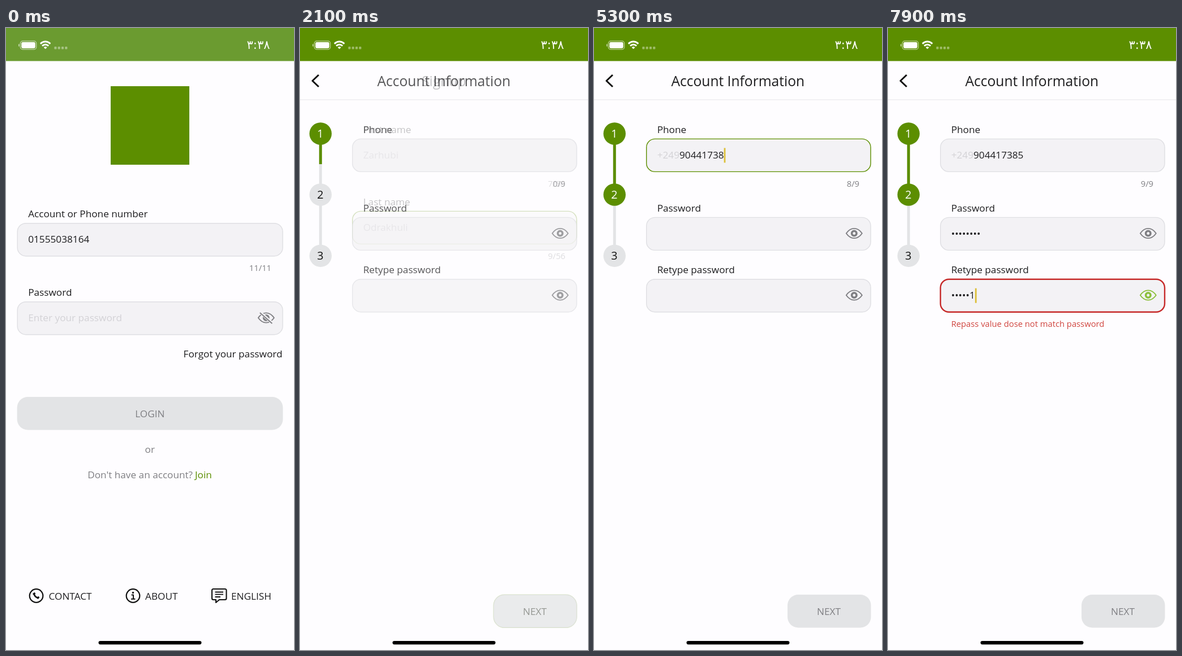
These frames come from a looping animation (509x1101 px, 8 s). An HTML page:

```html
<!DOCTYPE html>
<html lang="en">
<head>
<meta charset="utf-8">
<title>Sign up</title>
<style>
  html, body { margin: 0; width: 100%; height: 100%; overflow: hidden; background: #fefdff; }
  svg { display: block; font-family: "Open Sans", "Noto Sans", sans-serif; }
  .clock { font-family: "DejaVu Sans", sans-serif; }
</style>
</head>
<body>
<svg id="stage" width="509" height="1101" viewBox="0 0 509 1101"></svg>
<script>
const W = 509, H = 1101, LOOP = 8000, STEP = 100;
const GREEN = '#5c8e00', INK = '#1d1d1f', GREY = '#7f7f83', PALE = '#d3d2d6',
      OFF = '#e3e4e6', PAPER = '#fefdff', LIME = '#8cc03c', RED = '#d0453f';
const SIZE = 17.2, SMALL = 14.75;
const FIRST = 'Zarhubi', LAST = 'Odrakhuli', PASSWORD = 'ad237168';

// Key strokes by tick of 100 ms; "<" deletes.
const phoneKeys = [[33, '9'], [34, '0'], [35, '4'], [37, '4'], [40, '1'], [42, '5'], [43, '2'],
  [45, '<'], [46, '<'], [49, '7'], [52, '3'], [53, '8'], [56, '5']];
const passTicks = [60, 61, 62, 63, 64, 65, 66, 68];
const retypeTicks = [74, 75, 76, 77, 78, 79];

const stage = document.getElementById('stage');
const pen = document.createElement('canvas').getContext('2d');
const clamp = v => Math.max(0, Math.min(1, v));

function widthOf(s) {
  pen.font = `${SIZE}px "Open Sans", "Noto Sans", sans-serif`;
  return pen.measureText(s).width;
}

const text = (s, x, y, fill = INK, size = SIZE, anchor = 'start') =>
  `<text x="${x}" y="${y}" fill="${fill}" font-size="${size}" text-anchor="${anchor}">${s}</text>`;

const box = (x, y, w, h, r, fill, stroke = 'none', line = 1.4) =>
  `<rect x="${x}" y="${y}" width="${w}" height="${h}" rx="${r}" fill="${fill}" stroke="${stroke}" stroke-width="${line}"/>`;

const disc = (x, y, r, fill, stroke = 'none', line = 0) =>
  `<circle cx="${x}" cy="${y}" r="${r}" fill="${fill}" stroke="${stroke}" stroke-width="${line}"/>`;

const line = (d, color, w, fill = 'none') =>
  `<path d="${d}" fill="${fill}" stroke="${color}" stroke-width="${w}" stroke-linejoin="round"/>`;

const group = (s, x = 0, opacity = 1) =>
  `<g transform="translate(${x})" opacity="${opacity}">${s}</g>`;

function eye(y, color, crossed) {
  return `<g transform="translate(459.8 ${y})">` +
    line('M-14 0Q-8-8.6 0-8.6T14 0Q8 8.6 0 8.6T-14 0Z', color, 1.9) +
    disc(0, 0, 4.2, 'none', color, 3.6) +
    (crossed ? line('M-10.5-9.5L11 9.5', '#f3f2f5', 5) + line('M-11-9L10.5 10', color, 1.9) : '') +
    '</g>';
}

function field({ x = 92.7, y, label, value = '', tint = INK, count, border = '#dfdfe3', weight = 1.4 }) {
  const left = x + 19;
  return text(label, left, y - 10.7) +
    box(x, y, 489 - x, 58, 15, '#f3f2f5', border, weight) +
    text(value, left, y + 34.3, tint) +
    (count ? text(count, 469, y + 84.3, GREY, SMALL, 'end') : '');
}

const caret = (x, y) => box(x, y + 16, 2.8, 26, 0, '#dcc03a');

function nextButton(active) {
  return active
    ? box(342.2, 1003.3, 146.8, 58, 19, PAPER, GREEN) + text('NEXT', 415, 1039, GREEN, SIZE, 'middle')
    : box(342, 1003, 147.5, 58.5, 19, OFF) + text('NEXT', 415, 1039, GREY, SIZE, 'middle');
}

function footer() {
  const ring = x => disc(x, 1005, 11.8, 'none', '#111', 2.2);
  const handset = line('M49.5 1000.5Q50 1007.5 57.5 1009', '#111', 2.8) +
    line('M48.6 1000.2L50.8 1002.6M55.6 1007.4L58 1009.4', '#111', 4.4);
  const info = disc(224.5, 999.5, 1.7, '#111') +
    line('M221.6 1003.6H225V1010.6M221 1010.8H228.4', '#111', 2);
  const chat = line('M366.5 993H387Q389.5 993 389.5 995.5V1009.5Q389.5 1012 387 1012H377L371 1017V1012H366.5Q364 1012 364 1009.5V995.5Q364 993 366.5 993Z', '#111', 2.1) +
    line('M369.5 998.5H384M369.5 1002.7H384M369.5 1007H379', '#111', 1.8);
  return ring(53.5) + handset + ring(224.5) + info + chat +
    text('CONTACT', 75.5, 1011.5) + text('ABOUT', 246, 1011.5) + text('ENGLISH', 398, 1011.5);
}

function loginPage() {
  return box(0, 0, W, H, 0, PAPER) + box(0, 0, W, 58.5, 0, '#6b9b30') +
    box(185, 103, 139, 139, 0, GREEN) +
    field({ x: 20.2, y: 345.7, label: 'Account or Phone number', value: '01555038164', count: '11/11' }) +
    field({ x: 20.2, y: 484.7, label: 'Password', value: 'Enter your password', tint: PALE }) +
    eye(513, GREY, true) +
    text('Forgot your password', 488.5, 583, INK, SIZE, 'end') +
    box(19.6, 653, 469.8, 58.5, 19, OFF) + text('LOGIN', 254.3, 689.3, GREY, SIZE, 'middle') +
    text('or', 254.3, 752, GREY, SIZE, 'middle') +
    text("Don't have an account?", 330, 797, GREY, SIZE, 'end') + text('Join', 334, 797, GREEN) +
    footer();
}

function steps(grow) {
  const x = 36.3, ys = [187, 295, 403.3];
  const rail = (a, b, color) => line(`M${x} ${a}V${b}`, color, 5);
  const reached = [true, grow >= 0.8, false];
  return rail(187, 403, OFF) + rail(187, 187 + 108 * grow, GREEN) +
    ys.map((y, i) => disc(x, y, 19.7, reached[i] ? GREEN : OFF) +
      text(i + 1, x - 0.3, y + 7, reached[i] ? '#fff' : '#111', 19.7, 'middle')).join('');
}

const title = s => text(s, 254.3, 102.5, INK, 24.6, 'middle');

function namesPage(k) {
  const filled = k >= 15;
  return title('Signup') +
    field({ y: 196.4, label: 'First name', value: filled ? FIRST : '', count: `${filled ? FIRST.length : 0}/56` }) +
    field({ y: 324.4, label: 'Last name', value: filled ? LAST : '', count: `${filled ? LAST.length : 0}/56`,
            border: filled ? GREEN : undefined }) +
    nextButton(filled);
}

function typedPhone(k) {
  return phoneKeys.filter(([at]) => at <= k)
    .reduce((s, [, key]) => key === '<' ? s.slice(0, -1) : s + key, '');
}

// The last character stays readable while the field has focus.
function masked(ticks, k, focused) {
  const n = ticks.filter(at => at <= k).length;
  return n && focused ? '•'.repeat(n - 1) + PASSWORD[n - 1] : '•'.repeat(n);
}

function accountPage(k) {
  const phone = typedPhone(k), prefix = '+249', left = 111.7;
  const onPhone = k >= 30 && k < 57, onPass = k >= 57 && k < 71, onRetype = k >= 71;
  const pass = masked(passTicks, k, onPass), retype = masked(retypeTicks, k, onRetype);
  const wrong = k >= 60;
  const numberX = left + widthOf(prefix);
  return title('Account Information') +
    field({ y: 196.4, label: 'Phone', value: k >= 31 ? prefix : '', tint: PALE, count: `${phone.length}/9`,
            border: onPhone && k >= 31 ? GREEN : undefined }) +
    text(phone, numberX, 230.7) +
    field({ y: 335.4, label: 'Password', value: pass, border: onPass ? GREEN : undefined }) +
    eye(363.5, onPass ? LIME : GREY) +
    field({ y: 444.7, label: 'Retype password', value: retype,
            border: wrong ? (onRetype ? '#c62a2a' : RED) : undefined, weight: onRetype ? 2.4 : 1.4 }) +
    eye(473, onRetype ? LIME : GREY) +
    (wrong ? text('Repass value dose not match password', left, 528.8, RED, SMALL) : '') +
    (onPhone ? caret(numberX + widthOf(phone), 196.4) : '') +
    (onPass ? caret(left + widthOf(pass), 335.4) : '') +
    (onRetype ? caret(left + widthOf(retype), 444.7) : '') +
    nextButton(false);
}

function signupPage(k) {
  const fade = clamp((k - 18) / 4), grow = clamp((k - 18) / 6);
  return box(0, 0, W, H, 0, PAPER) + box(0, 0, W, 58.5, 0, GREEN) +
    line(`M0 127H${W}`, '#e7e6ea', 1.2) +
    line('M33 83L22 93.5L33 104', '#111', 3) + steps(grow) +
    (fade < 1 ? group(namesPage(k), 0, 1 - fade) : '') +
    (fade > 0 ? group(accountPage(k), 0, fade) : '');
}

function statusBar() {
  const wifi = line('M60.8 27.8Q69.6 20.4 78.4 27.8M64 31.6Q69.6 27 75.2 31.6', '#fff', 2.9) +
    line('M67 34.3Q69.6 32.2 72.2 34.3L69.6 37Z', '#fff', 0.6, '#fff');
  const dots = [0, 1, 2, 3].map(i => box(85.3 + i * 6.3, 33, 4.2, 4.4, 1, '#ffffff66')).join('');
  return box(25.3, 23.2, 28.4, 14.6, 4, 'none', '#ffffffa0', 1.2) + box(27.2, 25, 24.6, 11, 2.4, '#fff') +
    box(22, 28.2, 1.6, 4.6, 0.8, '#ffffffa0') + wifi + dots +
    `<g class="clock">${text('٣:٣٨', 446, 37, '#fff', 21, 'middle')}</g>`;
}

// Critically damped slide of the pushed page.
function slide(k) {
  if (k < 8) return 0;
  if (k > 11) return 1;
  const u = 17 * (k / 10 - 0.762);
  return 1 - (1 + u) * Math.exp(-u);
}

const shade = '<defs><linearGradient id="shade"><stop offset="0" stop-color="#000" stop-opacity="0"/>' +
  '<stop offset="1" stop-color="#000" stop-opacity=".17"/></linearGradient></defs>';

function draw(k) {
  const p = slide(k), x = W * (1 - p);
  stage.innerHTML = shade +
    (p < 1 ? group(loginPage(), -W * p / 3) : '') +
    (p > 0 ? group((p < 1 ? box(-14, 0, 14, H, 0, 'url(#shade)') : '') + signupPage(k), x) : '') +
    statusBar() + box(163.5, 1085, 182, 6.2, 3.1, '#000');
}

let shown = -1;
const start = performance.now();
function tick() {
  const k = Math.floor(((performance.now() - start) % LOOP) / STEP);
  if (k !== shown) draw(shown = k);
  requestAnimationFrame(tick);
}
tick();
</script>
</body>
</html>
```
